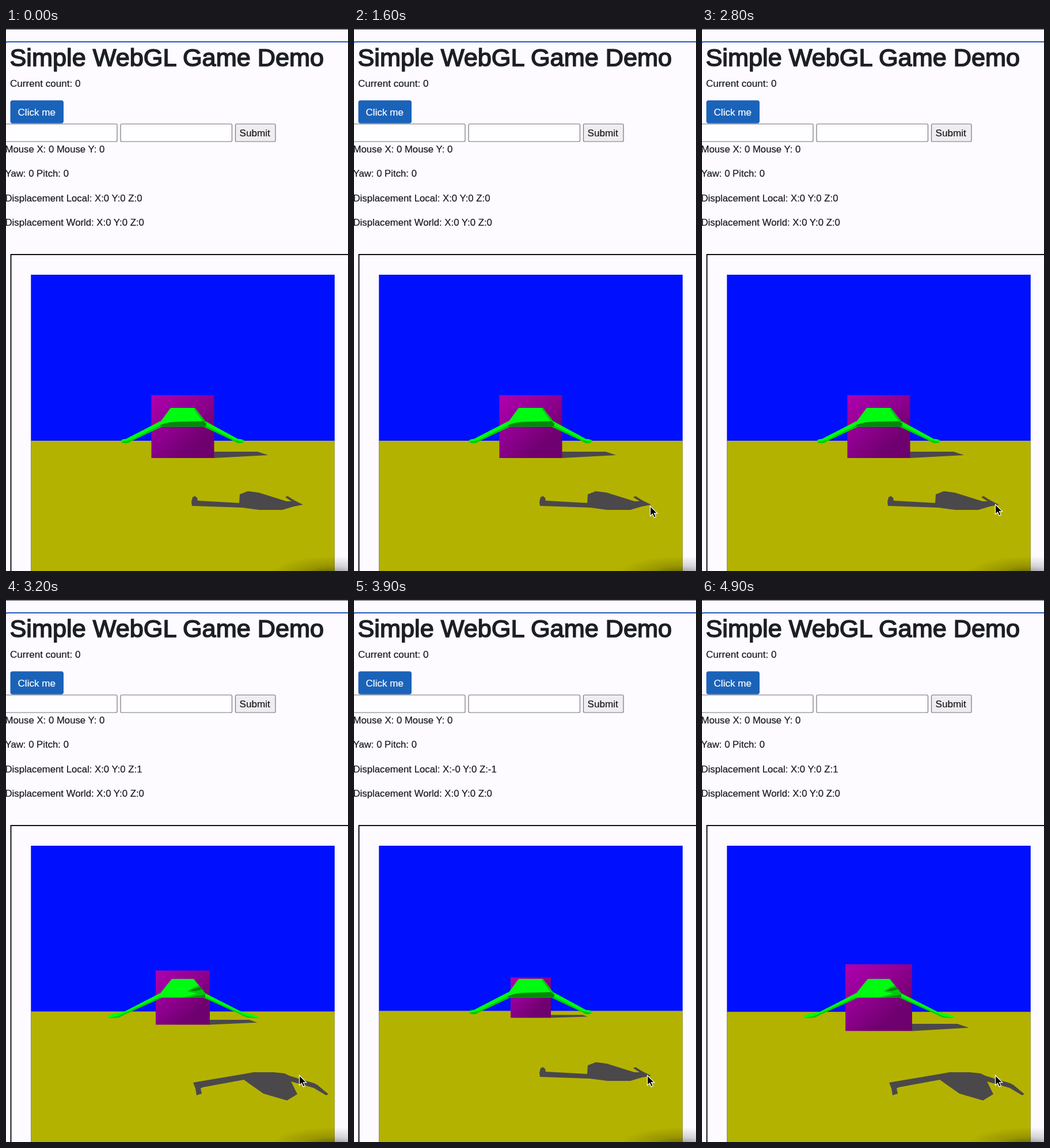
Write an HTML page that moves like this. It is 594 px wide and 942 px high and loops after 5000 ms.

```html
<!DOCTYPE html>
<html lang="en">
<head>
<meta charset="utf-8">
<title>Simple WebGL Game Demo</title>
<style>
  html, body { margin: 0; width: 100%; height: 100%; overflow: hidden; background: #fdfbff; }
  svg { display: block; }
  text { font: 16.75px "Liberation Sans", Arial, sans-serif; fill: #16181b; stroke: #16181b; stroke-width: 0.2; white-space: pre; }
  .title { font-size: 43.25px; fill: #1c1f23; stroke: #1c1f23; stroke-width: 1.6; }
  .wide { font-size: 17.1px; }
  .label { fill: #fff; stroke: #fff; }
  .field { fill: #fefdff; stroke: #77757a; stroke-width: 1.2; }
  .shade { fill: #4a484a; }
  .lit { fill: #00fb12; }
  .mid { fill: #00c80c; }
  .dark { fill: #008a08; }
</style>
</head>
<body>
<svg width="594" height="942" viewBox="0 0 594 942">
  <defs>
    <linearGradient id="purple" x1="0" y1="0" x2="0.85" y2="1">
      <stop offset="0" stop-color="#b000b0"/>
      <stop offset="0.5" stop-color="#8c008c"/>
      <stop offset="0.8" stop-color="#700070"/>
      <stop offset="1" stop-color="#6e006e"/>
    </linearGradient>
    <radialGradient id="vignette">
      <stop offset="0" stop-color="#000" stop-opacity="0.5"/>
      <stop offset="0.5" stop-color="#000" stop-opacity="0.16"/>
      <stop offset="1" stop-color="#000" stop-opacity="0"/>
    </radialGradient>
  </defs>

  <!-- page -->
  <rect width="594" height="2.5" fill="#2c2630"/>
  <path d="M-1 30V27Q-1 24 3 24H596" fill="none" stroke="#2459c0" stroke-width="2"/>
  <text class="title" x="6.5" y="66">Simple WebGL Game Demo</text>
  <text class="wide" x="7" y="102">Current count: 0</text>
  <rect x="7.5" y="125.5" width="92.5" height="40" rx="4" fill="#1a63b9"/>
  <text class="wide label" x="20.5" y="151.5">Click me</text>
  <rect class="field" x="-10" y="166.5" width="203" height="30.5" rx="2"/>
  <rect class="field" x="199" y="166.5" width="193.5" height="30.5" rx="2"/>
  <rect class="field" x="398.5" y="166.5" width="69.5" height="30.5" rx="2" style="fill:#efedf0"/>
  <text class="wide" x="405.5" y="187.5">Submit</text>
  <text x="-1.5" y="216">Mouse X: 0 Mouse Y: 0</text>
  <text x="-1.5" y="258">Yaw: 0 Pitch: 0</text>
  <text x="-1.5" y="300.5" id="local"></text>
  <text x="-1.5" y="343">Displacement World: X:0 Y:0 Z:0</text>
  <path d="M8.5 950V393H600" fill="none" stroke="#111" stroke-width="2"/>

  <!-- game view -->
  <rect x="43.3" y="428" width="527.5" height="514" fill="#0010ff"/>
  <rect id="ground" x="43.3" width="527.5" height="240" fill="#b4b200"/>
  <polygon id="cubeShadow" class="shade"/>
  <rect id="cube" fill="url(#purple)"/>

  <g id="away">
    <polygon class="shade" points="322,822 324,814 328,812 332,815 333,820 405,824 406,809 420,803.5 439,806 487,821 496,821 485,814 489,812 500,819 516,827 500,830 480,836 440,836 410,832 323,829"/>
    <path class="lit" d="M268 682L208 713Q200 713 199.5 717Q202 721 212 720L219 716L272 691ZM346 682L403 713Q413 713 413.5 717Q411 721 402 720L395 716L342 691Z"/>
    <path class="mid" d="M200 718Q203 721 212 720L219 716L272 691L270 688L216 715ZM413 718Q410 721 402 720L395 716L342 691L344 688L397 715Z"/>
    <polygon class="lit" points="286,659 328,659 348,685 347,691.5 268,691.5 266,686"/>
    <polygon class="mid" points="328,659 348,685 342,683 326,661"/>
    <path class="dark" d="M267 689Q280 683 300 683L342 682L348 686L347 691.5H268Z"/>
  </g>

  <g id="toward">
    <polygon class="shade" points="325,839 336,837 413,824 430,821 465,821 484,823 492,827 535,840 541,843 560,859 556,861 534,848 495,837 506,859 488,870 447,858 413,834 342,847 338,849 340,858 331,861 329,849"/>
    <path class="lit" d="M267 684L205 716L187 719L176 724L178 727L196 726L208 720L272 691ZM346 684L409 716L426 720L438 724L437 727L418 726L406 720L342 691Z"/>
    <path class="mid" d="M178 727L196 726L208 720L272 691L270 689L196 723ZM437 727L418 726L406 720L342 691L344 689L417 723Z"/>
    <polygon class="lit" points="288,659 326,659 346,684 346,691.5 268,691.5 267,685"/>
    <path class="mid" d="M315 681Q324 674 335 670L346 684V691.5H300Q322 689 332 684Z"/>
    <path class="dark" d="M318 680Q328 675 337 673L341 677L330 680ZM312 691.5Q332 689 346 686V691.5Z"/>
  </g>

  <ellipse cx="566" cy="950" rx="110" ry="34" fill="url(#vignette)"/>
  <path id="cursor" d="M0 0V17L4 13.4L6.8 19.6L9.8 18.2L7 12.2H12.2Z" fill="#000" stroke="#fff" stroke-width="1.2"/>
</svg>

<script>
const $ = id => document.getElementById(id);
const set = (id, attrs) => {
  for (const name in attrs) $(id).setAttribute(name, attrs[name]);
};

const CENTER = { x: 307, y: 691.5 };
const HALF = 54.5;   // half the cube's side at distance 1

// [time, distance to the cube]
const DISTANCE = [[0, 1], [2965, 1], [3200, 1.16], [3850, 1.603], [4500, 1], [4706, 0.809], [5000, 1.01]];
// [lateral offset, extra depth] on the floor
const SHADOW = [[HALF, 0], [163, 0.1], [163, 0.253], [HALF, 0.253]];

function track(keys, t) {
  const i = Math.max(1, keys.findIndex(key => key[0] > t));
  const [[t0, a], [t1, b]] = [keys[i - 1], keys[i]];
  return a + (b - a) * (t - t0) / (t1 - t0);
}

function draw(t) {
  const distance = track(DISTANCE, t);
  const half = HALF / distance;
  const backward = (t >= 2965 && t < 3850) || t >= 4706;
  const displacement = t < 2965 ? "X:0 Y:0 Z:0" : backward ? "X:0 Y:0 Z:1" : "X:-0 Y:0 Z:-1";

  $("local").textContent = "Displacement Local: " + displacement;
  set("ground", { y: CENTER.y + 24.5 / (1 + 0.117 * (distance - 1)) });
  set("cube", { x: CENTER.x - half, y: CENTER.y - half, width: 2 * half, height: 2 * half });
  set("cubeShadow", {
    points: SHADOW.map(([x, depth]) => {
      const scale = 1 / (distance + depth);
      return [CENTER.x + x * scale, CENTER.y + HALF * scale];
    }).join(" ")
  });
  set("away", { display: backward ? "none" : "inline" });
  set("toward", { display: backward ? "inline" : "none" });

  const p = Math.min(1, Math.max(0, (t - 900) / 900));
  const eased = p * p * (3 - 2 * p);
  set("cursor", {
    display: t < 900 ? "none" : "inline",
    transform: `translate(${549.5 - 40 * eased} ${851 - 24.5 * eased})`
  });
}

function tick() {
  const t = performance.now() % 5000;
  draw(Math.floor(t / 100) * 100);
  requestAnimationFrame(tick);
}
tick();
</script>
</body>
</html>
```
